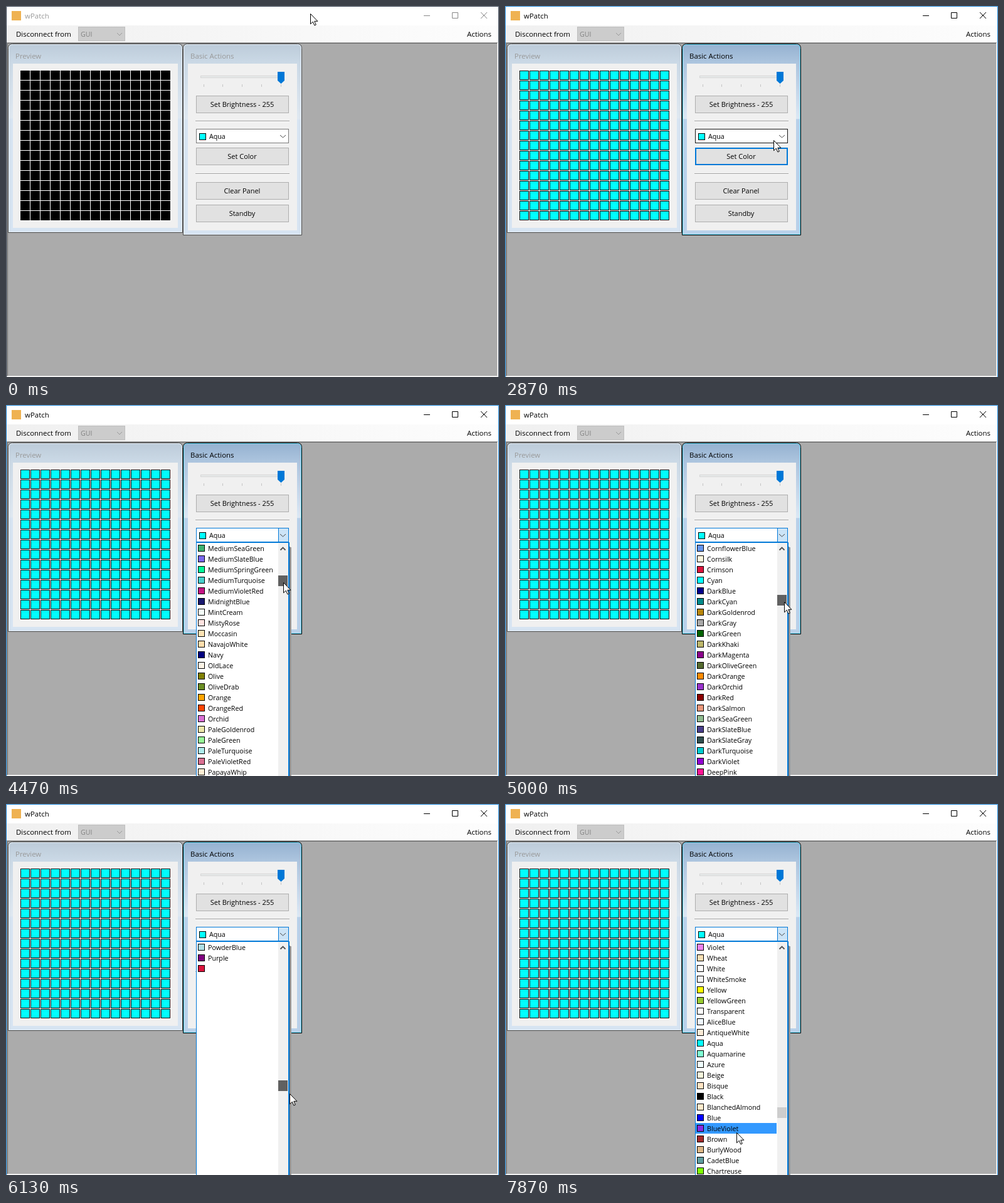
An HTML page for the animation above (8000 ms loop, 786 by 592 pixels).

```html
<!DOCTYPE html>
<html lang="en">
<head>
<meta charset="utf-8">
<title>LED panel control</title>
<style>
html, body { margin: 0; width: 100%; height: 100%; overflow: hidden; background: #ababab; }
svg { display: block; width: 786px; height: 592px; }
text { font: 11.45px "Open Sans", "Noto Sans", sans-serif; white-space: pre; }
.small { font-size: 10.7px; }
.button { font-size: 11px; text-anchor: middle; }
.line { fill: none; }
.crisp { shape-rendering: crispEdges; }
</style>
</head>
<body>
<svg id="stage" viewBox="0 0 786 592">
  <defs>
    <linearGradient id="bar"><stop stop-color="#f0f0f0"/><stop offset="1" stop-color="#fdfdfd"/></linearGradient>
    <linearGradient id="idle" x2="0" y2="1">
      <stop stop-color="#bccbd9"/><stop offset=".1" stop-color="#cbd9e6"/>
      <stop offset=".39" stop-color="#dfe8f1"/><stop offset=".4" stop-color="#d7e4f2"/>
    </linearGradient>
    <linearGradient id="active" x2="0" y2="1">
      <stop stop-color="#94b1d0"/><stop offset=".1" stop-color="#adc5df"/>
      <stop offset=".39" stop-color="#dce8f5"/><stop offset=".395" stop-color="#b9d1ea"/>
    </linearGradient>
  </defs>
</svg>
<script>
const STEP = 1000 / 15, LOOP = 8000;
const svg = document.getElementById('stage');

const COLORS = `Transparent AliceBlue AntiqueWhite Aqua Aquamarine Azure Beige Bisque Black BlanchedAlmond
Blue BlueViolet Brown BurlyWood CadetBlue Chartreuse Chocolate Coral CornflowerBlue Cornsilk Crimson Cyan
DarkBlue DarkCyan DarkGoldenrod DarkGray DarkGreen DarkKhaki DarkMagenta DarkOliveGreen DarkOrange DarkOrchid
DarkRed DarkSalmon DarkSeaGreen DarkSlateBlue DarkSlateGray DarkTurquoise DarkViolet DeepPink DeepSkyBlue
DimGray DodgerBlue Firebrick FloralWhite ForestGreen Fuchsia Gainsboro GhostWhite Gold Goldenrod Gray Green
GreenYellow Honeydew HotPink IndianRed Indigo Ivory Khaki Lavender LavenderBlush LawnGreen LemonChiffon
LightBlue LightCoral LightCyan LightGoldenrodYellow LightGray LightGreen LightPink LightSalmon LightSeaGreen
LightSkyBlue LightSlateGray LightSteelBlue LightYellow Lime LimeGreen Linen Magenta Maroon MediumAquamarine
MediumBlue MediumOrchid MediumPurple MediumSeaGreen MediumSlateBlue MediumSpringGreen MediumTurquoise
MediumVioletRed MidnightBlue MintCream MistyRose Moccasin NavajoWhite Navy OldLace Olive OliveDrab Orange
OrangeRed Orchid PaleGoldenrod PaleGreen PaleTurquoise PaleVioletRed PapayaWhip PeachPuff Peru Pink Plum
PowderBlue Purple Red RosyBrown RoyalBlue SaddleBrown Salmon SandyBrown SeaGreen SeaShell Sienna Silver SkyBlue
SlateBlue SlateGray Snow SpringGreen SteelBlue Tan Teal Thistle Tomato Turquoise Violet Wheat White WhiteSmoke
Yellow YellowGreen`.split(/\s+/);
const swatchFill = name => ({ Transparent: '#fff', Red: '#dc143c' })[name] || name;
const listIndex = (name, round) => COLORS.indexOf(name) + round * COLORS.length;

function add(tag, attrs, parent = svg) {
  const el = document.createElementNS('http://www.w3.org/2000/svg', tag);
  set(el, attrs);
  parent.appendChild(el);
  return el;
}
function set(el, attrs) {
  for (const key in attrs) el.setAttribute(key, attrs[key]);
}
const fillRect = (x, y, width, height, fill, parent) =>
  add('rect', { x, y, width, height, fill, class: 'crisp' }, parent);
const box = (x, y, w, h, fill, stroke, parent) =>
  add('rect', { x: x + .5, y: y + .5, width: w - 1, height: h - 1, fill, stroke }, parent);
const path = (d, stroke, parent, width = 1) =>
  add('path', { d, stroke, 'stroke-width': width, class: 'line' }, parent);
function label(x, y, content, cls = '', fill = '#000', parent = svg) {
  const el = add('text', { x, y, class: cls, fill }, parent);
  el.textContent = content;
  return el;
}
const show = (el, on) => el.setAttribute('visibility', on ? 'visible' : 'hidden');

// Main window
fillRect(0, 0, 786, 592, '#fff');
fillRect(1, 31, 784, 27, 'url(#bar)');
fillRect(1, 58, 784, 534, '#a0a0a0');
fillRect(2, 59, 782, 532, '#696969');
fillRect(3, 60, 780, 530, '#ababab');
fillRect(783, 59, 1, 532, '#e3e3e3');
fillRect(2, 590, 782, 1, '#e3e3e3');
fillRect(784, 58, 1, 534, '#fff');
fillRect(1, 591, 784, 1, '#fff');
const outline = path('M.5 592V.5H785.5V592');
fillRect(9, 8, 15, 15, '#efb252');
const mainTitle = label(30, 20, 'wPatch');
const controls = path('M666 15.5h10M711.5 10.5h9v9h-9zM757 10l10 10M767 10l-10 10');
label(16, 49, 'Disconnect from');
label(735, 49, 'Actions');
box(115, 33, 75, 23, '#ccc', '#bfbfbf');
label(119, 49, 'GUI', 'small', '#838383');
path('M177 43l4 4 4-4', '#999');

// Child windows
function childWindow(x, y, w, h, title) {
  const d = `M${x + .5} ${y + h - .5}v${8 - h}q0-7 7-7h${w - 15}q7 0 7 7v${h - 8}z`;
  const frame = add('path', { d, fill: 'url(#idle)', stroke: '#4b4b4b' });
  const glow = path(`M${x + 1.5} ${y + h - 1.5}v${10 - h}q0-7 7-7h${w - 17}q7 0 7 7v${h - 10}z`, '#e8f0f8');
  const name = label(x + 12, y + 24, title, '', '#999');
  fillRect(x + 8, y + 32, w - 16, h - 40, '#f0f0f0');
  return { frame, glow, name };
}
childWindow(3, 60, 279, 302, 'Preview');
const basic = childWindow(282, 60, 190, 306, 'Basic Actions');

fillRect(22, 102, 241, 241, '#fff');
const leds = add('g', { stroke: '#000' });
for (let i = 0; i < 225; i++) box(23 + i % 15 * 16, 103 + Math.floor(i / 15) * 16, 15, 15, 'inherit', '#000', leds)
  .removeAttribute('fill');

box(310, 111, 134, 4, '#e7eaea', '#d6d6d6');
for (let i = 0; i < 5; i++) fillRect(315 + Math.floor(i * 30.9), 125, 1, 4, '#c4c4c4');
add('path', { d: 'M433 105h11v14l-5.5 5-5.5-5z', fill: '#0078d7' });
for (const y of [183, 267]) {
  fillRect(302, y, 150, 1, '#a0a0a0');
  fillRect(302, y + 1, 150, 1, '#fff');
}
function button(y, caption) {
  const el = box(303, y, 148, 28, '#e1e1e1', '#adadad');
  label(376.5, y + 18, caption, 'button');
  return el;
}
button(143, 'Set Brightness - 255');
const setColor = button(226, 'Set Color');
const focusRing = add('rect', { x: 304, y: 227, width: 146, height: 26, fill: 'none', stroke: '#0078d7', 'stroke-width': 2 });
button(281, 'Clear Panel');
button(317, 'Standby');

const combo = box(303, 196, 148, 23, '#fff');
const comboButton = box(434, 196, 17, 23, '#cce4f7', '#0078d7');
box(308, 203, 11, 11, 'aqua', '#000');
label(324, 212, 'Aqua', 'small');
path('M437 206l4.5 4 4.5-4', '#444');

// Drop-down list
const drop = add('g');
fillRect(451, 226, 2, 366, '#6f7780', drop);
fillRect(453, 227, 2, 365, '#999b9d', drop);
box(303, 219, 148, 400, '#fff', '#0078d7', drop);
fillRect(450, 219, 2, 373, '#0078d7', drop);
fillRect(434, 220, 16, 372, '#f0f0f0', drop);
path('M437.5 231.5l4-4 4 4', '#505050', drop, 1.8);
const thumb = fillRect(434, 238, 15, 17, '#cdcdcd', drop);
const highlight = fillRect(304, 220, 129, 17, '#3399ff', drop);
const rows = Array.from({ length: 22 }, (_, i) => ({
  swatch: box(306, 223 + i * 17, 11, 11, '#fff', '#000', drop),
  name: label(322, 233 + i * 17, '', 'small', '#000', drop)
}));

const cursor = add('path', { d: 'M.5.5v16.3l3.8-3.6 2.6 5.8 2.4-1-2.5-5.7h5.1z', fill: '#fff', stroke: '#000' });

// Key poses: step, then values
const POINTER = [[4, 485, 12], [17, 384, 233], [19, 380, 238], [35, 380, 238], [45, 440, 208], [51, 440, 208],
  [54, 436, 249], [58, 438, 249], [75, 445, 314], [77, 446, 319], [84, 452, 379], [92, 452, 462],
  [97, 452, 504], [102, 452, 504], [108, 405, 486], [115, 372, 500], [118, 369, 524]];
const THUMB = [[58, 238], [75, 303], [84, 359], [92, 441], [97, 484]];
const SCROLL = [[58, listIndex('Aqua', 0)], [75, listIndex('CornflowerBlue', 1)], [84, listIndex('BurlyWood', 2)],
  [92, listIndex('PowderBlue', 3)], [97, listIndex('Violet', 4)]];

function pose(keys, step, ease = u => u) {
  const next = keys.findIndex(key => key[0] > step);
  if (next < 0) return keys[keys.length - 1].slice(1);
  if (next === 0) return keys[0].slice(1);
  const from = keys[next - 1], to = keys[next];
  const u = ease((step - from[0]) / (to[0] - from[0]));
  return from.slice(1).map((v, i) => v + (to[i + 1] - v) * u);
}
const smooth = u => u * u * (3 - 2 * u);

// How many rows the slow repaint has reached
function paintedRows(step) {
  if (step === 49) return 8;
  return step >= 78 && step < 97 ? (2 * step + 2) % 23 : 22;
}

function drawList(step, x, y) {
  const top = Math.round(pose(SCROLL, step)[0]);
  const painted = paintedRows(step);
  rows.forEach(({ swatch, name }, i) => {
    const color = COLORS[(top + i) % COLORS.length];
    swatch.setAttribute('fill', swatchFill(color));
    swatch.setAttribute('display', i <= painted ? 'inline' : 'none');
    name.textContent = i < painted ? color : '';
  });
  const dragging = step >= 58 && step < 103;
  set(thumb, { y: Math.round(pose(THUMB, step)[0]), fill: dragging ? '#606060' : '#cdcdcd' });
  const hovering = step >= 103 && x < 433;
  const row = hovering ? Math.floor((y - 220) / 17) : 0;
  set(highlight, { y: 220 + row * 17, display: hovering || step < 58 ? 'inline' : 'none' });
}

function draw(time) {
  const step = Math.floor((time + 5) / STEP);
  const [x, y] = pose(POINTER, step, step < 17 ? smooth : undefined).map(Math.round);
  const isActive = step >= 28, isOpen = step >= 48;

  outline.setAttribute('stroke', isActive ? '#1883d7' : '#2f3a4a');
  mainTitle.setAttribute('fill', isActive ? '#000' : '#999');
  controls.setAttribute('stroke', isActive ? '#000' : '#888');
  set(basic.frame, { fill: `url(#${isActive ? 'active' : 'idle'})`, stroke: isActive ? '#000' : '#4b4b4b' });
  basic.glow.setAttribute('stroke', isActive ? '#5fd6f2' : '#e8f0f8');
  basic.name.setAttribute('fill', isActive ? '#000' : '#999');
  leds.setAttribute('fill', step >= 29 ? 'aqua' : '#000');

  const overButton = !isOpen && x < 451 && y >= 226 && y < 254;
  const pressed = step === 28;
  set(setColor, {
    fill: pressed ? '#cce4f7' : overButton ? '#e5f1fb' : '#e1e1e1',
    stroke: pressed ? '#005499' : overButton ? '#0078d7' : '#adadad'
  });
  show(focusRing, step > 28 && !overButton && !isOpen);

  const overCombo = step >= 14 && step < 22 || x < 451 && y >= 196 && y < 219;
  combo.setAttribute('stroke', isOpen ? '#0078d7' : overCombo ? '#171717' : '#7a7a7a');
  show(comboButton, isOpen);

  show(drop, step >= 49);
  if (step >= 49) drawList(step, x, y);
  cursor.setAttribute('transform', `translate(${x} ${y})`);
}

const start = performance.now();
function tick() {
  draw((performance.now() - start) % LOOP);
  requestAnimationFrame(tick);
}
tick();
</script>
</body>
</html>
```
